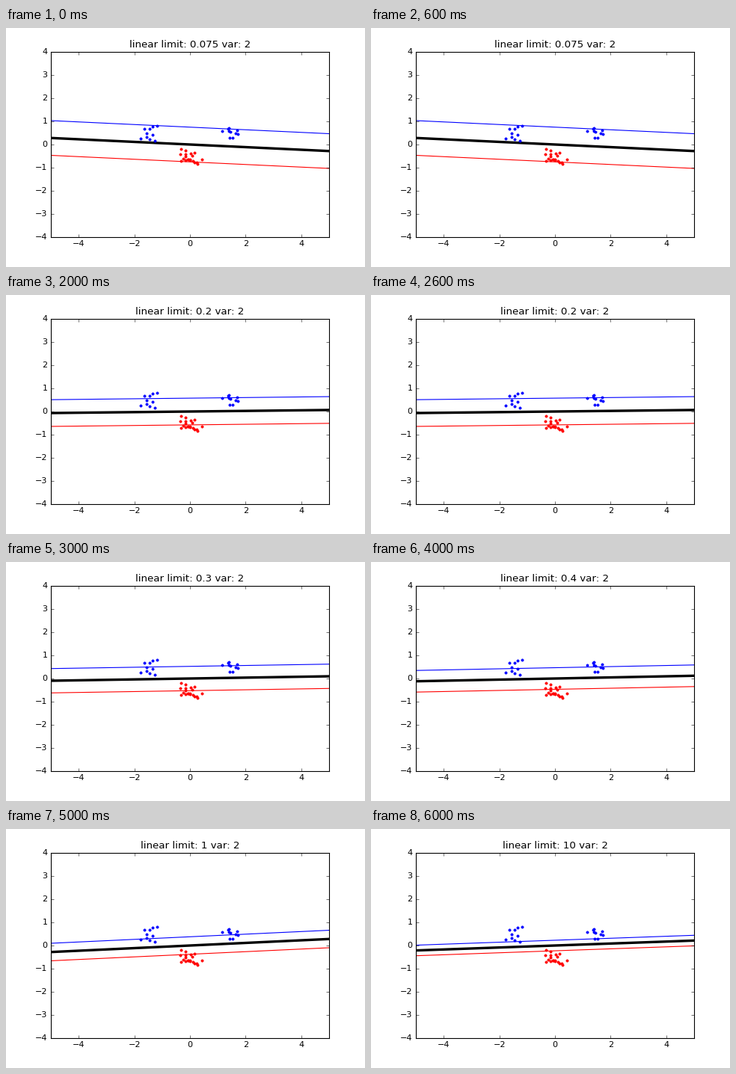
Recreate the animation shown at these times as a matplotlib script. Size 480 px wide and 320 px high, loop 7 s.

```python
import numpy as np
import matplotlib.pyplot as plt
from matplotlib.animation import FuncAnimation

plt.style.use("classic")
plt.rcParams.update({
    "font.family": "DejaVu Sans",
    "font.size": 10,
    "axes.titlesize": 12,
    "figure.facecolor": "white",
    "savefig.dpi": 80,
})

# One row per step: limit, slope of the boundary, vertical margin
STEPS = [
    (0.075, -0.0565, 0.75),
    (0.1, -0.028, 0.685),
    (0.2, 0.0132, 0.577),
    (0.3, 0.0192, 0.525),
    (0.4, 0.0238, 0.467),
    (1, 0.0563, 0.378),
    (10, 0.0427, 0.228),
]

BLUE = [
    (-1.77, .25), (-1.64, .67), (-1.56, .50), (-1.56, .31), (-1.45, .67),
    (-1.44, .21), (-1.34, .76), (-1.34, .41), (-1.26, .15), (-1.18, .80),
    (1.16, .58), (1.37, .67), (1.40, .71), (1.41, .58), (1.46, .54),
    (1.43, .28), (1.54, .28), (1.65, .47), (1.70, .60), (1.73, .44),
]
RED = [
    (-.31, -.19), (-.15, -.26), (-.36, -.42), (-.17, -.42), (-.17, -.50),
    (.03, -.40), (.15, -.36), (.07, -.48), (-.23, -.62), (-.31, -.71),
    (-.17, -.69), (-.09, -.66), (.01, -.63), (-.01, -.69), (.11, -.70),
    (.17, -.78), (.23, -.78), (.28, -.85), (.42, -.63), (-.05, -.66),
]

fig = plt.figure(figsize=(6, 4), dpi=80)
ax = fig.add_axes([0.125, 0.125, 0.775, 0.775])
ax.set_xlim(-5, 5)
ax.set_ylim(-4, 4)
ax.set_xticks(range(-4, 5, 2))
ax.set_yticks(range(-4, 5))
title = ax.set_title("")

xs = np.array([-5, 5])
# Margin side, colour, width
STYLES = [(-1, "red", 1), (0, "black", 3), (1, "blue", 1)]
lines = [ax.plot(xs, 0 * xs, color=color, lw=width)[0]
         for _, color, width in STYLES]

for points, color in ((BLUE, "blue"), (RED, "red")):
    ax.plot(*zip(*points), ".", color=color, mec=color, ms=6, mew=0.5)


def draw(i):
    limit, slope, margin = STEPS[i]
    title.set_text(f"linear limit: {limit:g} var: 2")
    for line, (side, _, _) in zip(lines, STYLES):
        line.set_ydata(slope * xs + side * margin)
    return [title, *lines]


anim = FuncAnimation(fig, draw, frames=len(STEPS), interval=1000,
                     repeat=True, repeat_delay=0)
plt.show()
```
